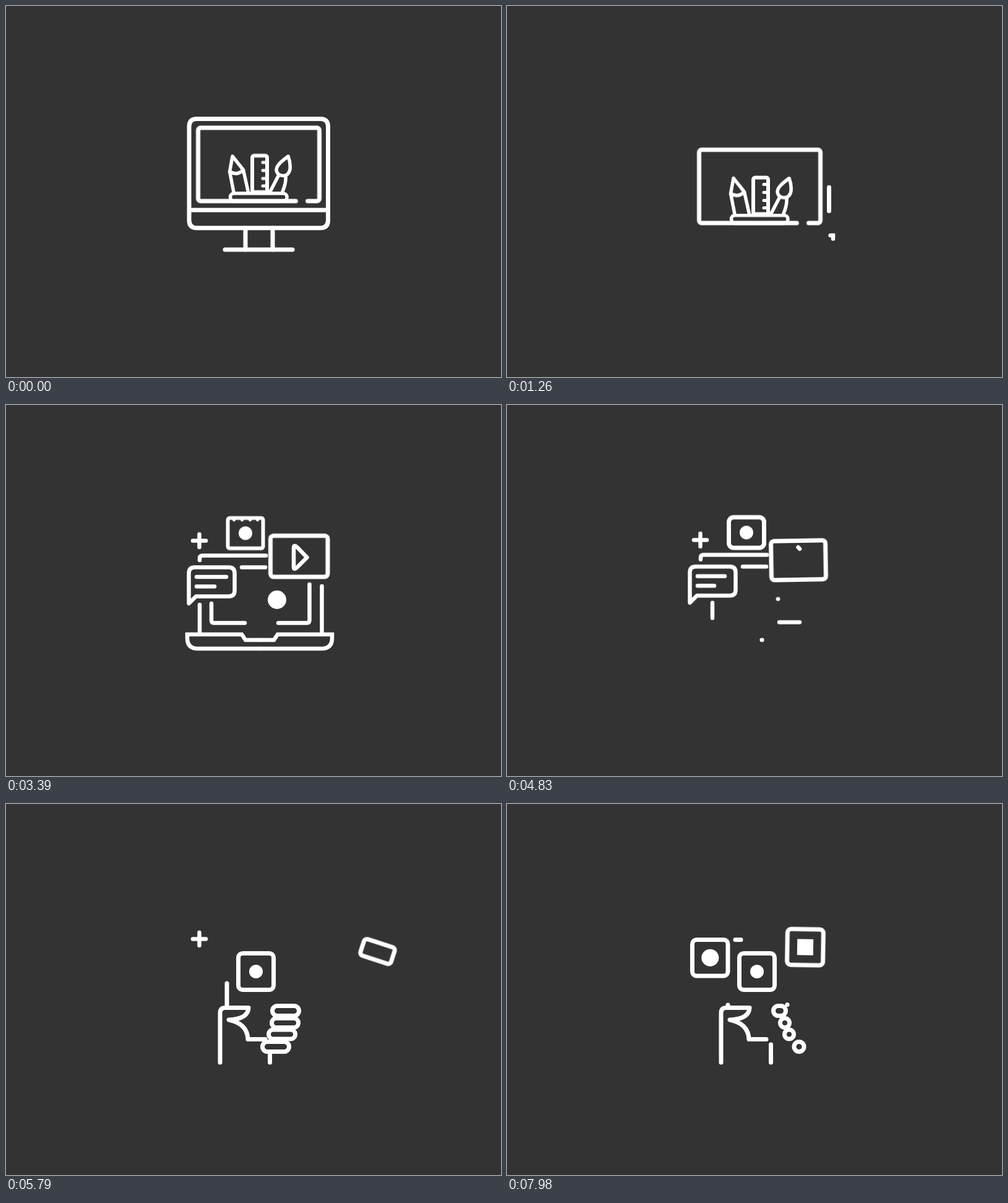
Recreate the animation shown at these times as an HTML page without scripts. Size 800 px wide and 600 px high, loop 8 s.

```html
<!DOCTYPE html>
<html lang="en">
<head>
<meta charset="utf-8">
<title>Design, laptop and phone icons</title>
<style>
html, body { margin: 0; width: 100%; height: 100%; overflow: hidden; background: #333; }
svg { display: block; width: 100vw; height: 100vh; fill: none; stroke: #fff; stroke-width: 7; stroke-linecap: round; stroke-linejoin: round; }
svg * { animation: 8s ease-in-out infinite; }
.dot { fill: #fff; stroke: none; }
.mid { stroke-width: 6.5; }
.tool { stroke-width: 5.5; transform-box: fill-box; transform-origin: 50% 100%; }
.pop { transform-box: fill-box; transform-origin: center; }
.finger { fill: #333; animation-name: finger; transform-box: fill-box; transform-origin: center; }

/* monitor */
@keyframes frame {
  0%, .4% { stroke-dasharray: 100 200; }
  10.1% { stroke-dasharray: 10 200; }
  15.75% { stroke-dasharray: 4.9 200; visibility: visible; }
  18.5%, 100% { stroke-dasharray: .1 200; visibility: hidden; }
}
@keyframes stand {
  0%, .4% { stroke-dasharray: 100 200; visibility: visible; }
  7.5%, 100% { stroke-dasharray: .1 200; visibility: hidden; }
}
@keyframes drop {
  0%, 3% { transform: none; }
  10.1%, 100% { transform: translateY(35.5px); }
}
@keyframes tool {
  0%, 20.6% { transform: none; }
  24.5%, 100% { transform: scale(0); }
}

/* screen, then video tile, then small tile */
@keyframes screen-move {
  0%, 3% { transform: translate(408.5px, 256.25px) rotate(0deg); }
  10.1%, 20.6% { transform: translate(408.5px, 291.75px) rotate(0deg); }
  25.5%, 53.6% { transform: translate(473.7px, 244.7px) rotate(180deg); }
  60.4% { transform: translate(471px, 251px) rotate(179deg); animation-timing-function: ease-in; }
  63.4% { transform: translate(515px, 238px) rotate(182deg); animation-timing-function: linear; }
  69% { transform: translate(610px, 226px) rotate(190deg); }
  72.4% { transform: translate(600.5px, 238.5px) rotate(198deg); animation-timing-function: ease-in; }
  76% { transform: translate(553px, 215px) rotate(220deg); animation-timing-function: linear; }
  79.5% { transform: translate(500px, 205px) rotate(250deg); animation-timing-function: ease-out; }
  83.6%, 100% { transform: translate(482px, 231.5px) rotate(271deg); }
}
@keyframes screen-size {
  0%, 20.6% { x: -98px; y: -59.25px; width: 196px; height: 118.5px; rx: 4px; stroke-dasharray: 52.4 3.1 44.5 0; }
  25.5%, 26.5% { x: -46.25px; y: -33.25px; width: 92.5px; height: 66.5px; rx: 5px; stroke-dasharray: 52.3 5.5 42.2 0; }
  30%, 53.6% { x: -46.25px; y: -33.25px; width: 92.5px; height: 66.5px; rx: 5px; stroke-dasharray: 52.3 0 47.7 0; }
  60.4% { x: -44px; y: -31.5px; width: 88px; height: 63px; rx: 5px; }
  69%, 72.6% { x: -26px; y: -14px; width: 52px; height: 28px; rx: 5px; }
  81%, 100% { x: -29px; y: -29px; width: 58px; height: 58px; rx: 6px; stroke-dasharray: 52.3 0 47.7 0; }
}
@keyframes play {
  0%, 24% { transform: scale(0); }
  26.25% { transform: scale(.85); }
  29%, 53.6% { transform: none; stroke-dasharray: 100 200; visibility: visible; }
  60.4% { transform: none; stroke-dasharray: 4 200; visibility: visible; }
  61%, 100% { stroke-dasharray: .1 200; visibility: hidden; }
}

/* ruler, then tile */
@keyframes ruler-move {
  0%, 3% { transform: translate(410px, 271.5px) rotate(0deg); }
  10.1%, 20.6% { transform: translate(410px, 307px) rotate(0deg); animation-timing-function: ease-in; }
  26.25% { transform: translate(379.5px, 181px) rotate(77.5deg); animation-timing-function: ease-out; }
  30.4% { transform: translate(376px, 142px) rotate(165deg); }
  35%, 53.6% { transform: translate(387px, 207.3px) rotate(270deg); }
  55%, 62% { transform: translate(387px, 206.3px) rotate(270deg); }
  70%, 100% { transform: translate(404px, 271px) rotate(270deg); }
}
@keyframes ruler-size {
  0%, 28% { x: -12px; y: -29.5px; width: 24px; height: 59px; rx: 3px; stroke-width: 6px; }
  35%, 53.6% { x: -24.5px; y: -28.5px; width: 49px; height: 57px; rx: 3px; stroke-width: 6px; }
  57%, 62% { x: -24.75px; y: -28.5px; width: 49.5px; height: 57px; rx: 8px; stroke-width: 7px; }
  70%, 100% { x: -29.5px; y: -28.5px; width: 59px; height: 57px; rx: 7px; stroke-width: 7px; }
}
@keyframes ticks {
  0%, 20.6% { stroke-dasharray: 7 99; stroke-dashoffset: 0; }
  26.25%, 28% { stroke-dasharray: 3 99; stroke-dashoffset: -8; transform: none; }
  35%, 53.6% { stroke-dasharray: 2 99; stroke-dashoffset: -8; transform: translateX(8.5px); visibility: visible; }
  56%, 100% { stroke-dasharray: 2 99; stroke-dashoffset: -8; transform: translateX(11px); visibility: hidden; }
}
@keyframes ruler-mark {
  0%, 33% { transform: scale(0); }
  38%, 100% { transform: none; }
}

/* laptop */
@keyframes base-right {
  0%, 15% { stroke-dasharray: .1 200; stroke-dashoffset: -47.4; visibility: hidden; }
  15.75% { stroke-dasharray: 3.9 200; stroke-dashoffset: -45.6; }
  19%, 53.6% { stroke-dasharray: 100 200; stroke-dashoffset: 0; visibility: visible; }
  60.4% { stroke-dasharray: .1 200; stroke-dashoffset: 0; visibility: visible; }
  60.9%, 100% { stroke-dasharray: .1 200; visibility: hidden; }
}
@keyframes base-left {
  0%, 17.5% { stroke-dasharray: .1 200; stroke-dashoffset: -99.9; visibility: hidden; }
  22%, 53.6% { stroke-dasharray: 100 200; stroke-dashoffset: 0; visibility: visible; }
  60.4% { stroke-dasharray: .1 200; stroke-dashoffset: 0; visibility: visible; }
  60.9%, 100% { stroke-dasharray: .1 200; visibility: hidden; }
}
@keyframes settle {
  0%, 53.6% { transform: none; }
  54%, 100% { transform: translateY(-1.2px); }
}
@keyframes side-left {
  0%, 22% { stroke-dasharray: .1 200; stroke-dashoffset: -40; visibility: hidden; }
  26.25% { stroke-dasharray: 44 200; stroke-dashoffset: -58.5; }
  30%, 53.6% { stroke-dasharray: 47 200; stroke-dashoffset: -73; visibility: visible; }
  59%, 100% { stroke-dasharray: .1 200; stroke-dashoffset: -120; visibility: hidden; }
}
@keyframes side-right {
  0%, 23% { stroke-dasharray: .1 200; visibility: hidden; }
  26.25% { stroke-dasharray: 34 200; }
  30%, 53.6% { stroke-dasharray: 78 200; visibility: visible; }
  59%, 100% { stroke-dasharray: .1 200; visibility: hidden; }
}
@keyframes inner-left {
  0%, 22% { stroke-dasharray: .1 200; visibility: hidden; }
  26.25% { stroke-dasharray: 63 200; }
  32%, 53.6% { stroke-dasharray: 85 200; stroke-dashoffset: 0; visibility: visible; }
  60.4% { stroke-dasharray: 25 200; stroke-dashoffset: -59; visibility: visible; }
  62%, 100% { stroke-dasharray: .1 200; stroke-dashoffset: -83; visibility: hidden; }
}
@keyframes inner-right {
  0%, 22% { stroke-dasharray: .1 200; visibility: hidden; }
  26%, 53.6% { stroke-dasharray: 112 200; visibility: visible; }
  60.4% { stroke-dasharray: 33 200; visibility: visible; }
  62.5%, 100% { stroke-dasharray: .1 200; visibility: hidden; }
}
@keyframes top-line {
  0%, 31% { stroke-dasharray: .1 200; visibility: hidden; }
  36%, 61% { stroke-dasharray: 100 200; visibility: visible; }
  66%, 100% { stroke-dasharray: .1 200; visibility: hidden; }
}
@keyframes plus {
  0%, 33% { transform: scale(0); }
  38%, 74% { transform: none; }
  79%, 100% { transform: scale(0); }
}
@keyframes badge {
  0%, 36% { transform: scale(0); }
  40%, 53.6% { transform: none; }
  60.4% { transform: scale(.22); }
  61.5%, 100% { transform: scale(0); }
}
@keyframes bubble {
  0%, 30.8% { transform: scale(0); }
  34.5% { transform: scale(1.36); }
  38%, 61% { transform: none; }
  67%, 100% { transform: scale(0); }
}
@keyframes text-one {
  0%, 36% { stroke-dasharray: .1 200; visibility: hidden; }
  40.4%, 53.6% { stroke-dasharray: 48 200; visibility: visible; }
  60.4%, 100% { stroke-dasharray: 44 200; visibility: visible; }
}
@keyframes text-two {
  0%, 40.6% { stroke-dasharray: .1 200; visibility: hidden; }
  42.3%, 53.6% { stroke-dasharray: 29 200; visibility: visible; }
  60.4%, 100% { stroke-dasharray: 27 200; visibility: visible; }
}

/* hand and phone */
@keyframes hand {
  0%, 63.8% { stroke-dasharray: .1 200; visibility: hidden; }
  71.5%, 100% { stroke-dasharray: 100 200; visibility: visible; }
}
@keyframes finger {
  0%, 62.5% { transform: scale(0); x: var(--x); width: 43px; }
  71%, 97.1% { transform: none; x: var(--x); width: 43px; }
  98.5% { transform: none; x: var(--mid); width: 30px; }
  99.75%, 100% { transform: none; x: var(--end); width: var(--w); }
}
@keyframes phone-left {
  0%, 67% { stroke-dasharray: .1 200; visibility: hidden; }
  72%, 97.1% { stroke-dasharray: 35 200; visibility: visible; }
  99.75%, 100% { stroke-dasharray: .1 200; visibility: visible; }
}
@keyframes phone-right {
  0%, 72.8% { stroke-dasharray: .1 200; visibility: hidden; }
  73.5% { stroke-dasharray: 12 200; }
  78%, 97.1% { stroke-dasharray: 52 200; visibility: visible; }
  99.75%, 100% { stroke-dasharray: .1 200; visibility: visible; }
}
@keyframes phone-top {
  0%, 77% { stroke-dasharray: .1 200; visibility: hidden; }
  82%, 97.1% { stroke-dasharray: 72 200; visibility: visible; }
  99.75%, 100% { stroke-dasharray: 9 200; visibility: visible; }
}
@keyframes left-tile {
  0%, 74% { transform: scale(0); }
  79% { transform: scale(1.78); }
  83.5%, 100% { transform: none; }
}
@keyframes right-mark {
  0%, 79% { transform: scale(0); }
  83.5%, 100% { transform: none; }
}
</style>
</head>
<body>
<svg viewBox="0 0 800 600">
  <!-- monitor -->
  <path pathLength="100" style="animation-name:frame" d="M520.5 331.5V195q0-12.500-12.500-12.500H308.500q-12.500 0-12.500 12.500V346.500q0 12.500 12.500 12.500H508q12.500 0 12.500-12.500Z"/>
  <path pathLength="100" style="animation-name:stand" d="M297 330H520"/>
  <path pathLength="100" style="animation-name:stand" d="M387 394V359"/>
  <path pathLength="100" style="animation-name:stand" d="M431 394V359"/>
  <path pathLength="100" style="animation-name:stand" d="M354 394H463"/>

  <!-- tools -->
  <g style="animation-name:drop">
    <rect class="tool" style="animation-name:tool" x="362.500" y="303" width="91.500" height="12.500" rx="6"/>
    <path class="tool" style="animation-name:tool" d="M368 301L361.500 268L366 243L383.500 265L391.500 301M361.500 268Q374 275 383.500 265"/>
    <path class="tool" style="animation-name:tool" d="M456 243C447 250 437 257 437 265Q438 274 448 274.500Q457 274 459 264Q460 253 456 243ZM441 273L427 300M452 274Q453 286 447 300"/>
  </g>

  <!-- laptop -->
  <g class="mid" stroke-linejoin="miter">
    <path pathLength="100" style="animation-name:base-right" d="M412 380H433L439 371H527V377Q527 394 510 394H410"/>
    <path pathLength="100" style="animation-name:base-left" d="M412 380H387L381 371H293V377Q293 394 310 394H410"/>
  </g>
  <g class="mid" style="animation-name:settle">
    <path style="animation-name:side-left" d="M313 250V370"/>
    <path style="animation-name:side-right" d="M510.500 293V371"/>
    <path style="animation-name:inner-left" d="M386 352.500H336Q332 352.500 332 348V321"/>
    <path style="animation-name:inner-right" d="M440 352.500H486Q490.500 352.500 490.500 348V290"/>
    <path pathLength="100" style="animation-name:top-line" d="M313 251V248Q313 243.500 318 243.500H420"/>
    <path pathLength="100" style="animation-name:top-line" d="M381 262.500H419"/>
    <path class="pop" style="animation-name:plus" d="M302 219.500H323M312.500 209V230"/>
    <circle class="dot pop" style="animation-name:badge" cx="438" cy="315" r="15"/>
    <g class="pop" style="animation-name:bubble">
      <path d="M295.500 321V272Q295.500 262.500 305 262.500H360Q369.500 262.500 369.500 272V300Q369.500 309.500 360 309.500H307Z"/>
      <path style="animation-name:text-one" d="M308 278H356"/>
      <path style="animation-name:text-two" d="M308 293.500H337"/>
    </g>
  </g>

  <!-- screen and tiles -->
  <g style="animation-name:screen-move">
    <rect pathLength="100" style="animation-name:screen-size"/>
    <rect class="dot pop" style="animation-name:right-mark" x="-13" y="-13" width="26" height="26"/>
  </g>
  <path class="pop mid" pathLength="100" style="animation-name:play" d="M470.500 230L486.500 246.500L469.500 263.500Q465 267 465 262V231Q465 225 470.500 230Z"/>
  <g style="animation-name:ruler-move">
    <path stroke-width="5" style="animation-name:ticks" d="M5-18.500h11M5-5.500h11M5 7.500h11M5 19.500h11"/>
    <rect style="animation-name:ruler-size"/>
    <circle class="dot pop" style="animation-name:ruler-mark" r="11"/>
  </g>
  <g class="pop" style="animation-name:left-tile">
    <rect x="299.500" y="219.500" width="57.500" height="58.500" rx="7"/>
    <circle class="dot" cx="328.300" cy="248.700" r="14"/>
  </g>

  <!-- phone in hand -->
  <path style="animation-name:phone-left" d="M357 325V290"/>
  <path style="animation-name:phone-top" d="M369 219.500H441"/>
  <path pathLength="100" style="animation-name:hand" d="M346 418V338Q346 329.500 354.500 329.500H392Q391 348 360 349Q390 355 391 380.500H419"/>
  <path pathLength="100" style="animation-name:hand" d="M426.500 418V389"/>
  <rect class="finger" style="--x:430.500px;--mid:430.500px;--end:430.500px;--w:20px" y="326.500" height="16" rx="8"/>
  <rect class="finger" style="--x:429.500px;--mid:436px;--end:441.500px;--w:15px" y="346.500" height="15" rx="7.500"/>
  <rect class="finger" style="--x:424.500px;--mid:437px;--end:448.500px;--w:15px" y="365" height="15" rx="7.500"/>
  <rect class="finger" style="--x:414.500px;--mid:466px;--end:464px;--w:16px" y="384.500" height="16" rx="8"/>
  <path style="animation-name:phone-right" d="M453 324.500V272.500"/>
</svg>
</body>
</html>
```
